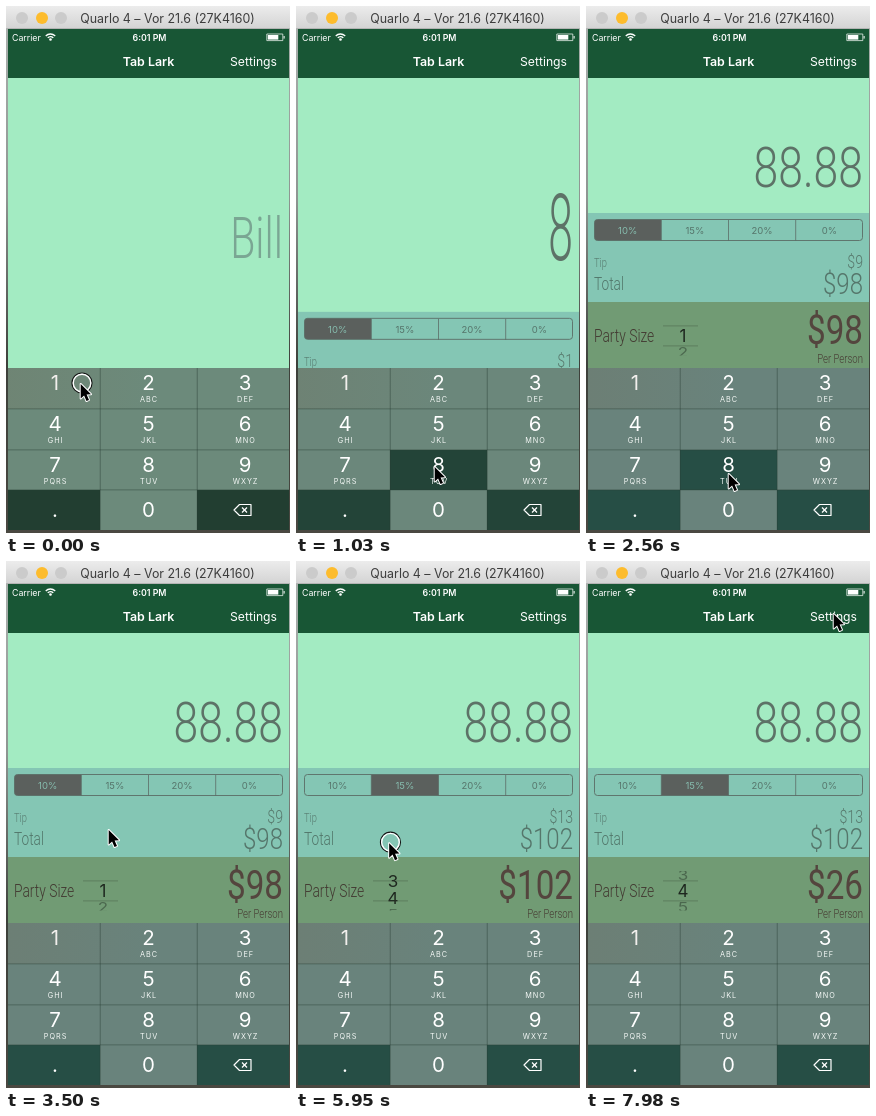
Write an HTML page with a canvas that moves like this. It is 284x527 px and loops after 8000 ms.

```html
<!DOCTYPE html>
<html lang="en">
<head>
<meta charset="utf-8">
<title>Tip calculator</title>
<style>
  html, body { margin: 0; width: 100%; height: 100%; overflow: hidden; }
  canvas { display: block; width: 284px; height: 527px; }
</style>
</head>
<body>
<canvas id="stage"></canvas>
<script>
const W = 284, H = 527, LOOP = 8000;
const UI = 'Inter, Roboto, sans-serif';
const NARROW = 'Roboto, "Open Sans", sans-serif';
const LETTERS = 0.72, DIGITS = 0.81;   // width ratios of the narrow face
const PANEL_TOP = 207, KEYS_TOP = 362, NAV_BOTTOM = 72;
const ROW = 24;                        // picker travel per value

const canvas = document.getElementById('stage');
const ctx = canvas.getContext('2d');
const ratio = window.devicePixelRatio || 1;
canvas.width = W * ratio;
canvas.height = H * ratio;

// Bill entry: [time, text]
const typed = [[860, '8'], [1290, '88'], [1730, '88.'], [2130, '88.8'], [2490, '88.88']];
// Key presses: [from, to, key]
const presses = [[810, 1100, '8'], [1250, 1400, '8'], [1690, 1800, '.'], [2090, 2195, '8'], [2440, 2610, '8']];
// Pointer moves: [from, to, x, y, optional curve control x, y]
const moves = [
  [60, 500, 138, 460],
  [1610, 1690, 50, 501],
  [1800, 1910, 142, 467],
  [2980, 3500, 102, 268, -16, 375],
  [3680, 3790, 115, 217],
  [4400, 4780, 94, 343],
  [4990, 5710, 93, 288],
  [5770, 6120, 92, 275],
  [6380, 6700, 167, 346],
  [6930, 7220, 250, 84],
  [7460, 7680, 247, 45],
  [7860, 7980, 247, 52]
];
const rings = [[0, 60], [4140, 4270], [4980, 6320]];

const within = (t, [from, to]) => t >= from && t < to;
const mix = (a, b, p) => a + (b - a) * p;
const mixColor = (a, b, p) => `rgb(${a.map((v, i) => Math.round(mix(v, b[i], p)))})`;
function ease(t, from, to) {
  const p = Math.min(1, Math.max(0, (t - from) / (to - from)));
  return p * p * (3 - 2 * p);
}

function rect(x, y, w, h, fill) {
  ctx.fillStyle = fill;
  ctx.fillRect(x, y, w, h);
}

function disc(x, y, r, fill) {
  ctx.fillStyle = fill;
  ctx.beginPath();
  ctx.arc(x, y, r, 0, Math.PI * 2);
  ctx.fill();
}

function polyline(points, close) {
  ctx.beginPath();
  points.forEach(([x, y]) => ctx.lineTo(x, y));
  if (close) ctx.closePath();
}

function vertical(y0, y1, ...colors) {
  const g = ctx.createLinearGradient(0, y0, 0, y1);
  colors.forEach((c, i) => g.addColorStop(i / (colors.length - 1), c));
  return g;
}

function text(str, x, y, size, color, { align = 'center', weight = 400, face = UI, sx = 1, sy = 1, spacing = 0 } = {}) {
  ctx.save();
  ctx.translate(x, y);
  ctx.scale(sx, sy);
  ctx.font = `${weight} ${size}px ${face}`;
  ctx.letterSpacing = spacing + 'px';
  ctx.textAlign = align;
  ctx.fillStyle = color;
  ctx.fillText(str, 0, 0);
  ctx.restore();
}

const label = (str, x, y, size, color, align = 'left') =>
  text(str, x, y, size, color, { align, face: NARROW, weight: 300, sx: LETTERS });
const amount = (value, y, size, color, weight = 300) =>
  text('$' + Math.round(value), 277, y, size, color, { align: 'right', face: NARROW, weight, sx: DIGITS });

function pointerAt(t) {
  let x = 74, y = 377;
  for (const [from, to, ex, ey, cx = (x + ex) / 2, cy = (y + ey) / 2] of moves) {
    if (t < from) break;
    const p = ease(t, from, to), q = 1 - p;
    x = q * q * x + 2 * q * p * cx + p * p * ex;
    y = q * q * y + 2 * q * p * cy + p * p * ey;
  }
  return { x, y };
}

function drawWindow() {
  rect(0, 0, W, H, vertical(23, H, '#a9afac', '#8e9692', '#3d403a', '#4a4841'));
  rect(0, 0, W, 23, vertical(0, 23, '#ececec', '#d3d3d3'));
  rect(0, 22, W, 1, '#b4b4b4');
  disc(16, 12, 6, '#cbcbcb');
  disc(36, 12, 6, '#fdbc2d');
  disc(55, 12, 6, '#cbcbcb');
  text('Quarlo 4 – Vor 21.6 (27K4160)', 161.5, 16.7, 12.4, '#3d3d3d');
}

function drawNav() {
  rect(2, 23, 281, NAV_BOTTOM - 23, '#185635');
  text('Carrier', 6, 34.5, 8.8, '#fff', { align: 'left' });
  text('6:01 PM', 143.5, 34.5, 8.8, '#fff', { weight: 600 });
  ctx.strokeStyle = '#fff';
  ctx.lineWidth = 1.3;
  for (const r of [3.8, 6.5]) {
    ctx.beginPath();
    ctx.arc(44.5, 34.5, r, -Math.PI * 0.76, -Math.PI * 0.24);
    ctx.stroke();
  }
  disc(44.5, 33.5, 1.3, '#fff');
  ctx.lineWidth = 0.7;
  ctx.strokeRect(260.8, 28, 16, 6.6);
  rect(261.8, 29, 10.5, 4.6, '#fff');
  rect(277.6, 30, 1, 2.6, '#fff');
  text('Tab Lark', 142.5, 60, 12.4, '#fff', { weight: 600 });
  text('Settings', 271, 60, 12.2, '#fff', { align: 'right' });
}

function drawBill(bill, panelTop) {
  rect(2, NAV_BOTTOM, 281, KEYS_TOP - NAV_BOTTOM, '#a3ebc2');
  if (!bill) {
    label('Bill', 277, 252, 57, '#7aa693', 'right');
    return;
  }
  // The field is squashed vertically as the panel rises.
  const sy = 1 + (panelTop - PANEL_TOP) * 0.0068;
  text(bill, 277, NAV_BOTTOM + 109 * sy, 55, '#5d7267', { align: 'right', face: NARROW, weight: 300, sx: DIGITS, sy });
}

function drawSegments(selected) {
  const cell = 67.25, ink = '#5c6e67';
  ctx.save();
  ctx.beginPath();
  ctx.roundRect(8.5, 213.5, 268, 21, 3);
  ctx.save();
  ctx.clip();
  rect(8 + selected * cell, 213, cell, 22, '#5b605d');
  ctx.restore();
  ctx.strokeStyle = ink;
  ctx.lineWidth = 0.9;
  ctx.stroke();
  ['10%', '15%', '20%', '0%'].forEach((name, i) => {
    if (i) rect(8 + i * cell - 0.4, 214, 0.8, 21, ink);
    text(name, 8 + (i + 0.5) * cell, 227.8, 9.5, i === selected ? '#86bcae' : '#56756b');
  });
  ctx.restore();
}

function drawPicker(position) {
  const mid = 330, radius = 28, step = Math.PI / 5;
  ctx.save();
  ctx.beginPath();
  ctx.rect(77, 310, 36, 39.5);
  ctx.clip();
  for (let value = 1; value <= 9; value++) {
    const angle = (value - position) * step;
    if (Math.abs(angle) > 1.3) continue;
    const sy = Math.cos(angle);
    ctx.globalAlpha = Math.abs(angle) > step * 0.7 ? 0.42 : 0.95;
    text(String(value), 97, mid + radius * Math.sin(angle) + 6.2 * sy, 17, '#19211a', { sy });
  }
  ctx.restore();
  for (const y of [319.5, 339.5]) rect(77, y, 35, 0.8, 'rgba(50,65,48,.4)');
}

function drawPanel(panelTop, bill, segment, party, picker) {
  const total = Number(bill) || 0, tip = total * [0.1, 0.15, 0.2, 0][segment];
  ctx.save();
  ctx.translate(0, panelTop - PANEL_TOP);
  rect(2, 207, 281, 89, '#84c6b4');
  rect(2, 296, 281, 66, '#719b74');
  drawSegments(segment);
  label('Tip', 8, 261, 13, '#587d71');
  amount(tip, 262, 17.5, '#587a6e');
  label('Total', 8, 284, 19, '#52776b');
  amount(total + tip, 288, 29.7, '#55766b');
  label('Party Size', 8, 336, 19.2, '#433a32');
  drawPicker(picker);
  amount((total + tip) / party, 338, 41, '#54453e', 400);
  label('Per Person', 277, 357, 13.3, '#483d35', 'right');
  ctx.restore();
}

function drawBackspace() {
  ctx.strokeStyle = '#fff';
  ctx.lineWidth = 1.2;
  ctx.lineJoin = 'round';
  polyline([[228, 504], [233.5, 498.5], [245, 498.5], [245, 509.5], [233.5, 509.5]], true);
  ctx.stroke();
  polyline([[236, 501.5], [241, 506.5]]);
  ctx.stroke();
  polyline([[241, 501.5], [236, 506.5]]);
  ctx.stroke();
}

function drawKeys(t, covered) {
  const light = mixColor([108, 138, 123], [105, 131, 124], covered);
  const dark = mixColor([34, 62, 49], [38, 78, 69], covered);
  const edges = [2, 94, 191, 283], centers = [49, 142.5, 239];
  const tops = [362, 403, 444, 484, 524];
  const keys = ['1', '2', '3', '4', '5', '6', '7', '8', '9', '.', '0', 'back'];
  const letters = ['', 'ABC', 'DEF', 'GHI', 'JKL', 'MNO', 'PQRS', 'TUV', 'WXYZ'];
  const pressed = presses.find(p => within(t, p));

  keys.forEach((key, i) => {
    const col = i % 3, row = Math.floor(i / 3);
    const x = edges[col], y = tops[row];
    const special = key === '.' || key === 'back';
    const down = pressed && pressed[2] === key;
    rect(x, y, edges[col + 1] - x, tops[row + 1] - y, special !== Boolean(down) ? dark : light);
    if (key === 'back') drawBackspace();
    else text(key, centers[col], row === 3 ? 511.3 : y + 22.3, 20.5, '#fff');
    if (letters[i]) text(letters[i], centers[col] + 0.6, y + 33.5, 7.3, '#f4f8f6', { spacing: 1 });
  });

  const warm = ctx.createLinearGradient(2, 0, 150, 0);
  warm.addColorStop(0, 'rgba(125,105,80,.16)');
  warm.addColorStop(1, 'rgba(125,105,80,0)');
  rect(2, KEYS_TOP, 148, 41, warm);
  for (const y of tops.slice(1, 4)) rect(2, y - 0.5, 281, 0.8, 'rgba(40,62,54,.55)');
  for (const x of edges.slice(1, 3)) rect(x - 0.2, KEYS_TOP, 0.8, 162, 'rgba(40,62,54,.55)');
}

function drawPointer({ x, y }, ring) {
  if (ring) {
    for (const [r, width, color] of [[10, 1.2, '#151515'], [8.8, 1.4, '#fff']]) {
      ctx.strokeStyle = color;
      ctx.lineWidth = width;
      ctx.beginPath();
      ctx.arc(x + 2, y, r, 0, Math.PI * 2);
      ctx.stroke();
    }
  }
  ctx.save();
  ctx.translate(x + 0.7, y + 1);
  polyline([[0, 0], [0, 14.5], [3.4, 11.4], [5.8, 17], [8.3, 15.9], [5.9, 10.5], [10.3, 10.3]], true);
  ctx.strokeStyle = '#fff';
  ctx.lineWidth = 2;
  ctx.lineJoin = 'round';
  ctx.stroke();
  ctx.fillStyle = '#000';
  ctx.fill();
  ctx.restore();
}

function draw(t) {
  ctx.setTransform(ratio, 0, 0, ratio, 0, 0);
  const pointer = pointerAt(t);
  const entry = typed.filter(([time]) => t >= time).pop();
  const bill = entry ? entry[1] : '';
  const rise = ease(t, 860, 1280);
  const panelTop = mix(KEYS_TOP, PANEL_TOP, rise);

  let picker = 1;
  if (t >= 4990) {
    const dragged = 1 + (343 - pointerAt(Math.min(t, 6300)).y) / ROW;
    picker = mix(dragged, 4, ease(t, 6320, 6560));
  }

  drawWindow();
  drawBill(bill, panelTop);
  drawPanel(panelTop, bill, t < 4200 ? 0 : 1, t < 6560 ? 1 : 4, picker);
  drawNav();
  drawKeys(t, rise);
  drawPointer(pointer, rings.some(r => within(t, r)));
}

function tick() {
  draw(performance.now() % LOOP);
  requestAnimationFrame(tick);
}
tick();
</script>
</body>
</html>
```
